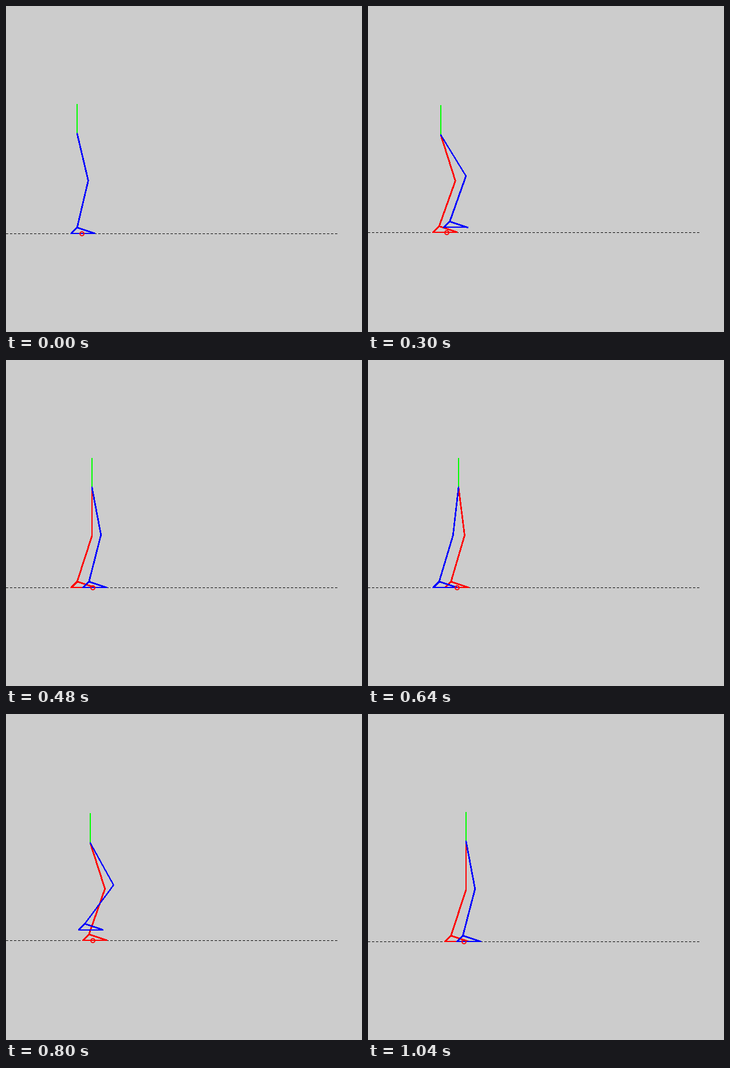
A matplotlib script that plays this animation: 621 px wide and 569 px high, repeating every 1.06 s.

```python
import numpy as np
import matplotlib.pyplot as plt
from matplotlib.animation import FuncAnimation
from matplotlib.collections import LineCollection

W, H, DPI = 621, 569, 64
PX = 72 / DPI            # points per pixel
FRAMES, INTERVAL = 53, 20

SCALE = 207              # pixels per metre
LEG = 84.2               # thigh and shank length
TORSO = 0.25 * SCALE
SOLE = 0.05 * SCALE      # ankle height, also ankle to heel
TOE = 0.15 * SCALE
LIFT = 0.1 * SCALE
STEP = 0.1 * SCALE
START = 124.6            # first ankle position
SWING = 16.6             # frames one foot is in the air

# turning points: the body sways back, then glides over the standing foot
SWAY_TIMES = (0, 6.5, 31, 37.5, 62)
HIP_X = (START, 116, 158.4, 147, 189.4)
BALANCE_X = (132.5, 130.4, 155.8, 151.4, 179)
DIP_TIMES = (0, 8.5, 22, 31, 40, 52)
HEIGHT = (226, 217.4, 226.4, 226.4, 221.6, 226.4)


def ease(u, times, values):
    """Cosine easing from one turning point to the next."""
    i = np.clip(np.searchsorted(times, u, side="right") - 1, 0, len(times) - 2)
    s = (u - times[i]) / (times[i + 1] - times[i])
    return values[i] + (values[i + 1] - values[i]) * (1 - np.cos(np.pi * s)) / 2


def swing(u, begin, x0, x1):
    """Ankle x and lift of the moving foot."""
    s = np.clip((u - begin) / SWING, 0, 1)
    x = x0 + (x1 - x0) * s * s * (3 - 2 * s)
    return x, LIFT * 16 * s**2 * (1 - s)**2


def leg_segments(hip, ankle):
    hip, ankle = np.array(hip), np.array(ankle)
    d = ankle - hip
    dist = np.hypot(*d)
    bend = np.sqrt(max(LEG**2 - dist**2 / 4, 0))
    knee = (hip + ankle) / 2 + bend * np.array([d[1], -d[0]]) / dist
    heel = ankle + (-SOLE, SOLE)
    toe = ankle + (TOE, SOLE)
    path = [hip, knee, ankle, heel, toe, ankle]
    return list(zip(path, path[1:]))


def stroke(segment):
    """Steep diagonals are thinner, as on an aliased display."""
    dx, dy = np.abs(segment[1] - segment[0])
    return (1 if 0.4 * dy < dx < 0.78 * dy else 1.6) * PX


fig = plt.figure(figsize=(W / DPI, H / DPI), dpi=DPI, facecolor="#cccccc")
ax = fig.add_axes([0, 0, 1, 1])
ax.set_xlim(0.5, W + 0.5)
ax.set_ylim(H + 0.5, 0.5)
ax.axis("off")


def add_leg(color, zorder):
    leg = LineCollection([], colors=color, antialiaseds=False,
                         capstyle="round", zorder=zorder)
    return ax.add_collection(leg, autolim=False)


ground, = ax.plot([], [], color="black", lw=PX, dashes=(3, 3),
                  antialiased=False, zorder=1)
torso, = ax.plot([], [], color="#00ff00", lw=2 * PX, antialiased=False,
                 solid_capstyle="butt", zorder=2)
stance_leg = add_leg("#ff0000", 3)
swing_leg = add_leg("#0000ff", 4)
balance, = ax.plot([], [], "o", ms=7 * PX, mfc="none", mec="#ff0000",
                   mew=1.8 * PX, antialiased=False, zorder=5)


def set_leg(leg, hip, ankle):
    segments = leg_segments(hip, ankle)
    leg.set_segments(segments)
    leg.set_linewidths([stroke(s) for s in segments])


def update(n):
    u = n if n <= 26 else n - 1      # the pose is held between the two steps
    hip_x = ease(u, SWAY_TIMES, HIP_X)
    height = ease(u, DIP_TIMES, HEIGHT)
    top, floor = (H - height) / 2, (H + height) / 2
    hip = (hip_x, top + TORSO)

    if n < 28:
        stance_x = START
        foot_x, lift = swing(u, 1.7, START, START + STEP)
    else:
        stance_x = START + STEP
        foot_x, lift = swing(u, 32.7, START, START + 2 * STEP)

    ground.set_data([0.5, 578.5], [floor, floor])
    torso.set_data([hip_x, hip_x], [top, hip[1]])
    set_leg(stance_leg, hip, (stance_x, floor - SOLE))
    set_leg(swing_leg, hip, (foot_x, floor - SOLE - lift))
    balance.set_data([ease(u, SWAY_TIMES, BALANCE_X)], [floor])
    return ground, torso, stance_leg, swing_leg, balance


anim = FuncAnimation(fig, update, frames=FRAMES, interval=INTERVAL, repeat=True)
plt.show()
```
